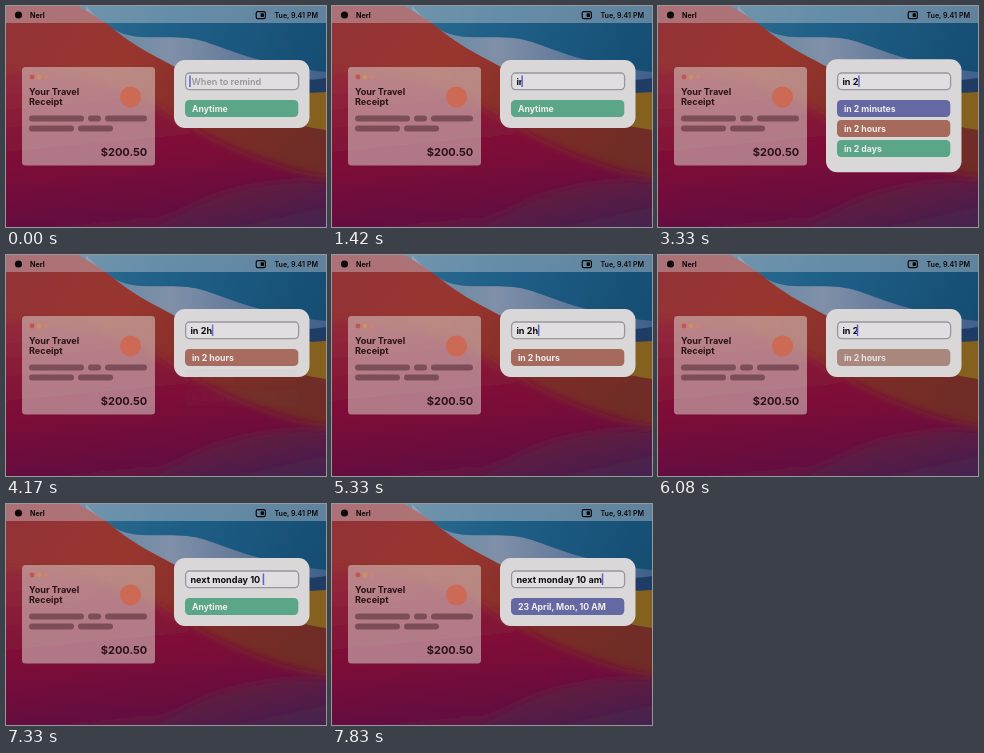
An HTML page for the animation above (8 s loop, 320 by 221 pixels).

```html
<!DOCTYPE html>
<html lang="en">
<head>
<meta charset="utf-8">
<title>Reminder picker</title>
<style>
  html, body { margin: 0; width: 100%; height: 100%; overflow: hidden; background: #7a2a38; }
  svg { display: block; width: 100vw; height: 100vh; }
  text { font-family: Inter, "Open Sans", sans-serif; font-weight: 700; white-space: pre; }
  .bar { font-size: 7.1px; fill: #0b0809; }
  .title { font-size: 9.1px; fill: #2b1215; }
  .price { font-size: 11px; fill: #2b1215; }
  .field { font-size: 9.1px; fill: #0c0b10; }
  .hint { font-size: 9.1px; font-weight: 600; fill: #98969b; }
  .chip { font-size: 8.7px; fill: #f1eeee; }
</style>
</head>
<body>
<svg viewBox="0 0 320 221" preserveAspectRatio="none">
  <defs>
    <linearGradient id="sky" x2="1" y2=".3">
      <stop offset="0" stop-color="#3a7394"/>
      <stop offset=".5" stop-color="#1f6088"/>
      <stop offset="1" stop-color="#154c72"/>
    </linearGradient>
    <linearGradient id="ridge">
      <stop offset="0" stop-color="#5d86a2"/>
      <stop offset=".35" stop-color="#8090a8"/>
      <stop offset="1" stop-color="#40608a"/>
    </linearGradient>
    <linearGradient id="hill" x2="1" y2=".5">
      <stop offset="0" stop-color="#933238"/>
      <stop offset=".4" stop-color="#98362e"/>
      <stop offset=".75" stop-color="#7c2c28"/>
      <stop offset="1" stop-color="#702c26"/>
    </linearGradient>
    <linearGradient id="crimson" x1=".4" x2=".6" y2="1">
      <stop offset="0" stop-color="#92283a"/>
      <stop offset=".5" stop-color="#7a0a38"/>
      <stop offset="1" stop-color="#561646"/>
    </linearGradient>
    <linearGradient id="plum" x2=".7" y2="1">
      <stop offset=".2" stop-color="#66183c"/>
      <stop offset="1" stop-color="#402452"/>
    </linearGradient>
    <filter id="soft" x="-5%" y="-5%" width="110%" height="110%">
      <feGaussianBlur stdDeviation="4"/>
    </filter>
  </defs>

  <rect width="320" height="221" fill="url(#sky)"/>
  <path d="M80 0C96 18 112 30 135 31S180 29 200 36S260 60 320 66V130H80Z" fill="url(#ridge)"/>
  <path d="M240 66C270 74 300 76 320 72V100H240Z" fill="#1f3c64"/>
  <path d="M230 100C260 84 300 88 320 86V140H230Z" fill="#85611f"/>
  <path d="M0 0H72C95 12 108 24 122 34S160 56 190 72S270 118 320 124V221H0Z" fill="url(#hill)"/>
  <g filter="url(#soft)">
    <path d="M-20 66C60 66 110 76 149 100S250 160 340 176V240H-20Z" fill="url(#crimson)"/>
    <path d="M130 240C180 190 250 168 340 176V240Z" fill="url(#plum)"/>
  </g>

  <rect width="320" height="17" fill="#d0d0d8" opacity=".4"/>
  <circle cx="12.5" cy="9" r="3.6" fill="#0b0809"/>
  <text class="bar" x="24" y="11.8">Nerl</text>
  <rect x="250.2" y="5.6" width="9.2" height="7" rx="1.6" fill="none" stroke="#0b0809" stroke-width="1.2"/>
  <rect x="254.6" y="7.3" width="3.4" height="3.6" rx=".6" fill="#0b0809"/>
  <text class="bar" x="268.4" y="11.7" style="font-weight:600">Tue, 9.41 PM</text>

  <rect x="16" y="61" width="133" height="98.5" rx="3.5" fill="#d8c9c5" opacity=".56"/>
  <circle cx="26" cy="71" r="2.4" fill="#c4544c"/>
  <circle cx="33" cy="71" r="2.4" fill="#cd9064"/>
  <circle cx="40" cy="71" r="2.4" fill="#c98478"/>
  <text class="title" x="23" y="88.6">Your Travel</text>
  <text class="title" x="23" y="99">Receipt</text>
  <circle cx="124.5" cy="91" r="10.5" fill="#cc6a55"/>
  <g id="lines" fill="#46202a" opacity=".5"></g>
  <text class="price" x="141.3" y="149.8" text-anchor="end">$200.50</text>

  <rect id="panel" x="168" width="135.5" rx="11" fill="#dad7d9"/>
  <rect x="179.6" y="67" width="113" height="16.6" rx="4" fill="#e0dee0" stroke="#98969c" stroke-width="1.3"/>
  <text id="hint" class="hint" x="185.6" y="78.7">When to remind</text>
  <clipPath id="reveal"><rect id="wipe" x="180" y="66" height="18"/></clipPath>
  <g clip-path="url(#reveal)">
    <text id="first" class="field" x="184.4" y="78.7">in 2h</text>
    <text id="second" class="field" x="184.4" y="78.7">next monday 10 am</text>
  </g>
  <rect id="caret" y="69.5" width="1.5" height="11.5" fill="#5b66cc"/>
  <g id="chips"></g>
</svg>
<script>
const LOOP = 8000;
const BLUE = '#6468a3', RUST = '#a66a5c', GREEN = '#5ba688';
const $ = id => document.getElementById(id);

function add(parent, tag, attrs, text = '') {
  const el = document.createElementNS('http://www.w3.org/2000/svg', tag);
  for (const name in attrs) el.setAttribute(name, attrs[name]);
  el.textContent = text;
  return parent.appendChild(el);
}

[[23, 109.5, 55], [82, 109.5, 13], [99, 109.5, 42], [23, 119.5, 45], [72, 119.5, 35]]
  .forEach(([x, y, width]) => add($('lines'), 'rect', { x, y, width, height: 6, rx: 3 }));

// Each track is a list of [time, value] steps, interpolated linearly.
const OPEN = [1930, 2330], NARROW = [3800, 4180], CLEAR = [5970, 6300], DATE = [7500, 7800];
const during = ([a, b], [c, d]) => [[a, 0], [b, 1], [c, 1], [d, 0]];
const chips = [
  ['Anytime', GREEN, 0, [[1830, 1], [2230, 0], ...during(CLEAR, DATE)]],
  ['in 2 minutes', BLUE, 0, during(OPEN, NARROW)],
  ['in 2 hours', RUST, 1, during(OPEN, NARROW)],
  ['in 2 days', GREEN, 2, during(OPEN, NARROW)],
  ['in 2 hours', RUST, 0, during(NARROW, CLEAR)],
  ['23 April, Mon, 10 AM', BLUE, 0, [[DATE[0], 0], [DATE[1], 1]]]
].map(([label, fill, slot, track]) => {
  const el = add($('chips'), 'g', { transform: `translate(179 ${94 + slot * 20})` });
  add(el, 'rect', { width: 113.3, height: 17, rx: 4.2, fill });
  add(el, 'text', { class: 'chip', x: 7, y: 11.7 }, label);
  return { el, track };
});

// The caret wipes across the field, uncovering or hiding the text behind it.
const SWAP = 6450;
const short = $('first').getSubStringLength(0, 4);
const full = $('first').getComputedTextLength();
const caretTrack = [
  [1300, 0], [1670, short], [3830, short], [3950, full], [5920, full], [6410, 0],
  [6500, 0], [7480, $('second').getComputedTextLength()]
];

const ramp = (t, a, b) => Math.min(1, Math.max(0, (t - a) / (b - a)));
const easeOut = p => 1 - (1 - p) ** 3;

function sample(track, t) {
  let [t0, v0] = track[0];
  for (const [t1, v1] of track) {
    if (t < t1) return t1 === t0 ? v0 : v0 + (v1 - v0) * ramp(t, t0, t1);
    [t0, v0] = [t1, v1];
  }
  return v0;
}

function blink(t) {
  if (t > 4680 || (t > 1300 && t < 2100)) return 1;
  const phase = (t + 4230) % 670;
  return Math.min(ramp(phase, 0, 200), 1 - ramp(phase, 333, 533));
}

const show = (id, on) => $(id).setAttribute('visibility', on ? 'visible' : 'hidden');

let start;
function draw(now) {
  start ??= now;
  const t = (now - start) % LOOP;

  const grown = easeOut(ramp(t, 1830, 2120)) - easeOut(ramp(t, 3830, 4200));
  $('panel').setAttribute('y', 54 - 0.8 * grown);
  $('panel').setAttribute('height', 68 + 45 * grown);
  chips.forEach(({ el, track }) => el.setAttribute('opacity', sample(track, t)));

  const width = sample(caretTrack, t);
  show('hint', width === 0);
  show('first', t < SWAP);
  show('second', t >= SWAP);
  $('wipe').setAttribute('width', 4.6 + width);
  $('caret').setAttribute('x', width ? 184.2 + width : 183.2);
  $('caret').setAttribute('opacity', blink(t));
  requestAnimationFrame(draw);
}
requestAnimationFrame(draw);
</script>
</body>
</html>
```
